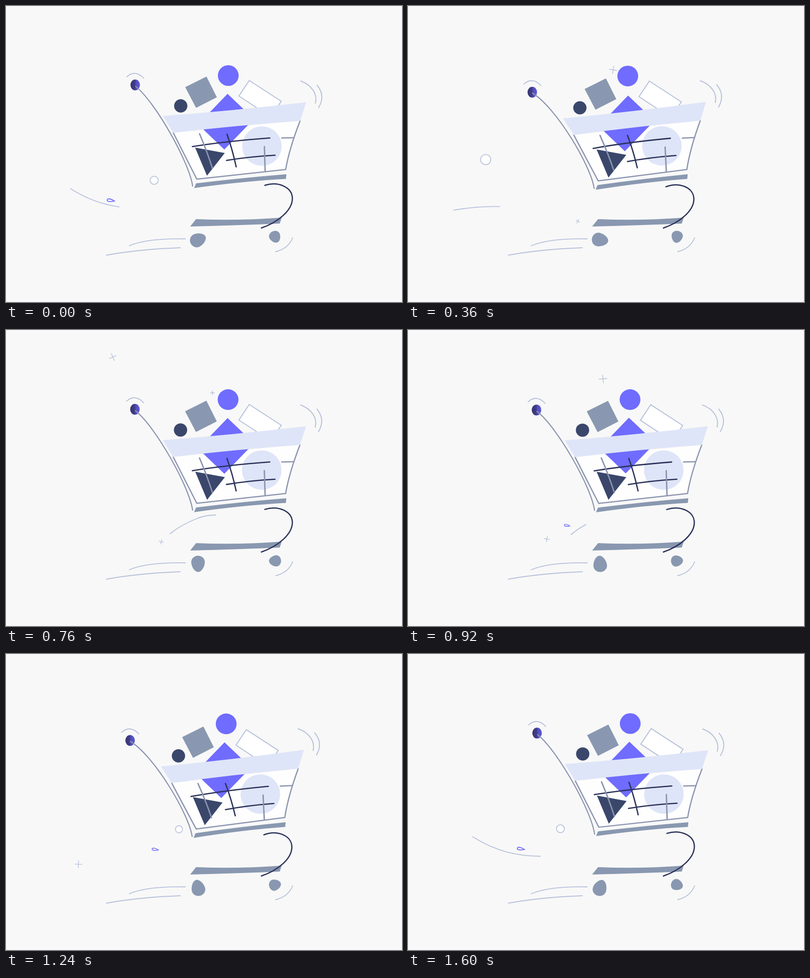
An HTML page with a canvas for the animation above (1640 ms loop, 800x600 px).

```html
<!DOCTYPE html>
<html lang="en">
<head>
<meta charset="utf-8">
<title>Shopping cart</title>
<style>
html, body { margin: 0; width: 100%; height: 100%; overflow: hidden; background: #f8f8f8; }
canvas { display: block; width: 800px; height: 600px; }
</style>
</head>
<body>
<canvas id="stage" width="800" height="600"></canvas>
<script>
const ctx = document.getElementById('stage').getContext('2d');
const LOOP = 1640, STEP = 40, TAU = Math.PI * 2;
const PURPLE = '#6f6cff', GREY = '#8998b0', PALE = '#dfe5f8', NAVY = '#3a476b',
      INK = '#2b3259', WIRE = '#8b94af', FAINT = '#b7c2db';
const clamp = v => Math.max(0, Math.min(1, v));
const mix = (a, b, k) => a.map((v, i) => v + (b[i] - v) * k);

function stroke(path, color, width) {
  ctx.strokeStyle = color;
  ctx.lineWidth = width;
  ctx.stroke(new Path2D(path));
}
function fill(path, color) {
  ctx.fillStyle = color;
  ctx.fill(new Path2D(path));
}
function disc(x, y, r, color) {
  ctx.beginPath();
  ctx.arc(x, y, r, 0, TAU);
  ctx.fillStyle = color;
  ctx.fill();
}
function at(x, y, draw) {
  ctx.save();
  ctx.translate(x, y);
  draw();
  ctx.restore();
}

// Trails: a path revealed by its head, then erased by its tail.
const trails = [
  { d: 'M325 447C290 420 240 408 192 407C160 405 122 409 91 414', len: 242, head: 25, tail: 216 },
  { d: 'M424 375Q402 375 384 383Q353 395 329 415', len: 107, head: 535, tail: 771 },
  { d: 'M350 400C320 408 300 410 271 410C225 410 180 402 130 370', len: 230, head: 1324, tail: 1515 }
];
function drawTrail(tr, t) {
  const run = 236, now = t < tr.head ? t + LOOP : t;
  const h = clamp((now - tr.head) / run), e = clamp((now - tr.tail) / run);
  if (h <= e) return;
  ctx.save();
  ctx.lineCap = 'butt';
  ctx.setLineDash([(h - e) * tr.len, 2000]);
  ctx.lineDashOffset = -e * tr.len;
  stroke(tr.d, FAINT, 1.8);
  ctx.restore();
}

function cross(x, y, r, turn) {
  at(x, y, () => {
    ctx.rotate(turn);
    stroke(`M${-r} 0H${r}M0 ${-r}V${r}`, FAINT, 1.4);
  });
}
// Each particle gets its age in ms.
const particles = [
  { start: 1160, life: 960, draw(a) {
    const x = 354 - 0.0554 * a - 2.54e-7 * a ** 3;
    const y = 355.3 - 44 * (a / 840) ** 5.6;
    const r = (7.2 + 3.1 * (a / 840) ** 2) * clamp(a / 60);
    disc(x, y, r, '#fff');
    ctx.strokeStyle = FAINT;
    ctx.lineWidth = 1.7;
    ctx.stroke();
  } },
  { start: 880, life: 980, draw(a) {
    const x = 323 - 0.0509 * a - 2.19e-10 * a ** 4;
    const y = 396.5 - 11.5 * (a / 920) ** 9;
    at(x, y, () => {
      ctx.rotate(0.12);
      const s = (0.72 + 0.33 * a / 920) * clamp((a + 30) / 70);
      ctx.scale(s, s);
      stroke('M8 0C3 -3 -7 -5 -7 -0.5C-7 4 2 2 8 0Z', PURPLE, 1.9);
    });
  } },
  { start: 320, life: 980, draw(a) {
    const d = 0.0253 * a + 2.24e-7 * a ** 3;
    cross(344 - d, 436.5 - 0.27 * d + 0.0011 * d * d, 4 + 3 * (a / 920) ** 2, 0.5 - a * 0.0005);
  } },
  { start: 300, life: 500, draw(a) {
    const k = a / 300;
    cross(418 - 86 * k ** 2, 131.5 - 35.5 * k ** 1.8, 7.5 * clamp(a / 60), 0.02 + a * 0.0025);
  } },
  { start: 720, life: 480, draw(a) {
    const k = a / 200;
    cross(418 - 24 * k ** 2, 131 - 32 * k ** 1.35, 8 * clamp(a / 80), -0.1);
  } }
];

function wheel(x, y, long, wide, turn) {
  at(x, y, () => {
    ctx.rotate(turn);
    ctx.scale(long, wide);
    fill('M1 0C1 0.45 0.45 0.95 -0.2 1C-0.7 1 -1 0.5 -1 0C-1 -0.5 -0.7 -1 -0.2 -1C0.45 -0.95 1 -0.45 1 0Z', GREY);
  });
}

function inBasket(u, draw) {
  at(566, 420, () => {
    ctx.rotate(-0.02 * u);
    ctx.translate(-566, -420);
    draw();
  });
}

function render(t) {
  const u = (1 - Math.cos(2 * TAU * t / LOOP)) / 2;  // cart sway
  const v = Math.sin(TAU * t / LOOP);                // slow drift of the goods
  const goods = (ux, uy, vx, vy, draw) => at(u * ux + v * vx, u * uy + v * vy, draw);

  ctx.fillStyle = '#f8f8f8';
  ctx.fillRect(0, 0, 800, 600);
  ctx.lineCap = 'round';
  ctx.lineJoin = 'miter';

  trails.forEach(tr => drawTrail(tr, t));
  particles.forEach(p => {
    const age = (t - p.start + LOOP) % LOOP;
    if (age < p.life) p.draw(age);
  });
  stroke('M249 486C275 475 315 471 362 472M203 505Q270 493 352 490M579 470Q570 492 545 498', FAINT, 1.9);

  // Undercarriage
  fill('M384 432Q470 435.5 557 429L553 441Q470 444.5 372 447Z', GREY);
  const turn = -0.44 + 5 * TAU * t / LOOP;
  wheel(388, 474, 16.6, 13.8, turn);
  wheel(543.5, 468, 12.2, 11.4, turn + TAU / 4);
  const k = mix([523, 363.5, 550, 355, 579, 367, 578.5, 391], [521, 366.5, 548, 356, 578, 368, 577.5, 392], u);
  stroke(`M${k[0]} ${k[1]}C${k.slice(2)}S548 439 516 450`, INK, 2.5);

  // Goods sticking out
  goods(-5.8, 4, 0.4, 0, () => fill('M405 143L426 185L384 206.5L362 164.5Z', GREY));
  goods(-5.3, 4, -0.7, 0, () => disc(353, 202.5, 13.4, NAVY));
  goods(-4.7, 0.8, -0.5, 0.2, () => disc(449, 141, 21, PURPLE));
  goods(-5, 1.8, 1, -0.5, () => {
    const box = 'M491.5 151L556 193L535 225L470.5 182.5Z';
    fill(box, '#fff');
    stroke(box, FAINT, 2);
  });

  // Basket and its contents
  const body = 'M338 257L385.5 351L565 331.5Q572 290 594 233';
  inBasket(u, () => fill(body + 'Z', '#fefefe'));
  goods(-3.7, -0.3, -0.5, -0.3, () => disc(517, 284, 40, PALE));
  goods(-4.6, 2.2, 1.5, 1.3, () => fill('M447.5 178L501 229L441 291L388 240Z', PURPLE));
  goods(-2.8, 3.5, 1.7, 0.5, () => fill('M382 287L442 298L406 344Z', NAVY));
  inBasket(u, () => {
    stroke(body, WIRE, 2.4);
    stroke('M557 267.5L581 267', WIRE, 2.4);
    stroke('M376.5 285Q445 274 533 267.5M445.5 313Q490 305.5 543.5 302.5M446.5 260Q457.5 291 465 326', INK, 2.6);
    stroke('M391 259Q407 297 417 329M522 285L523.5 334', WIRE, 2.8);
    fill('M317 223Q462 212 606.5 195L594 233Q466 242 338 257Z', PALE);
    fill('M384 359.5Q480 348 566.5 341L565.5 350.5Q480 355 380 369Z', GREY);
    stroke('M595.5 152C617 160 630 178 625 197M628.5 160.5Q646 182 631.5 206', FAINT, 2);
  });

  // Handle
  at(-10.3 * u, 15.3 * u, () => {
    stroke('M244 143.5Q261 128 278.5 146.5', FAINT, 1.8);
    const g = ctx.createLinearGradient(252, 0, 271, 0);
    g.addColorStop(0, '#38366f');
    g.addColorStop(0.45, '#403c8c');
    g.addColorStop(0.55, '#514dbb');
    g.addColorStop(1, '#5f5bd4');
    ctx.beginPath();
    ctx.ellipse(261, 160, 9.6, 11, 0, 0, TAU);
    ctx.fillStyle = g;
    ctx.fill();
  });
  const r = mix([262, 163, 303, 196, 371, 319, 377, 365], [251, 177, 299, 206, 370, 325, 376, 370], u);
  stroke(`M${r[0]} ${r[1]}C${r.slice(2)}`, WIRE, 2.2);
}

function tick() {
  render(Math.floor(performance.now() % LOOP / STEP) * STEP);
  requestAnimationFrame(tick);
}
tick();
</script>
</body>
</html>
```
